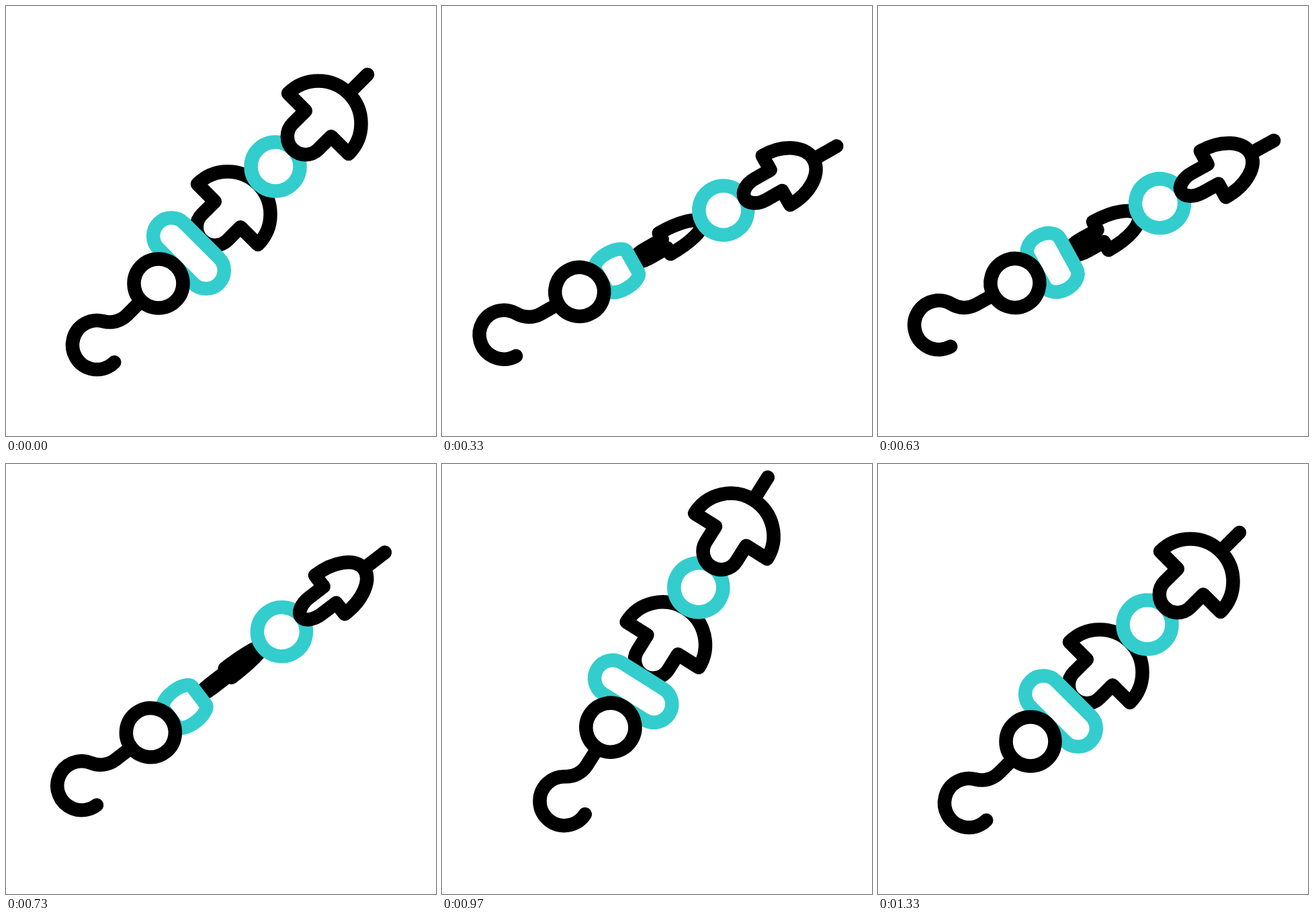
These frames come from a looping animation (640 by 640 pixels, 2000 ms). An HTML page with a canvas:

```html
<!DOCTYPE html>
<html lang="en">
<head>
<meta charset="utf-8">
<title>Skewer</title>
<style>
  html, body { margin: 0; height: 100%; overflow: hidden; background: #fff; }
  canvas { display: block; width: 100vw; height: 100vh; object-fit: contain; }
</style>
</head>
<body>
<canvas width="640" height="640"></canvas>
<script>
const ctx = document.querySelector('canvas').getContext('2d');
const BLACK = '#000', TEAL = '#33cdce';
const LOOP = 2000, FPS = 30;
const RING = 36.5, STEM = 27, CAP = 63.6;
const rad = deg => deg * Math.PI / 180;

function smooth(p) {
  p = Math.min(1, Math.max(0, p));
  return p * p * (3 - 2 * p);
}

// Eased progress from 0 to 1 between two moments, in animation steps.
const tween = (now, start, end) => smooth((now - start) / (end - start));

// Two equal dips below full width, the first deepest at the given moment.
function pinch(now, first, depth) {
  const dip = middle => smooth(1 - Math.abs(now - middle) / 7);
  return 1 - depth * (dip(first) + dip(first + 13.4));
}

// Squashes the outline across the stick while the line keeps its weight.
function piece(color, x, squash, outline) {
  ctx.save();
  ctx.translate(x, 0);
  ctx.scale(1, squash);
  ctx.beginPath();
  outline();
  ctx.closePath();
  ctx.restore();
  ctx.strokeStyle = color;
  ctx.fill();
  ctx.stroke();
}

const ring = () => ctx.arc(0, 0, RING, 0, rad(360));

function onion() {
  ctx.arc(0, -RING, STEM, rad(180), rad(360));
  ctx.arc(0, RING, STEM, 0, rad(180));
}

function mushroom() {
  ctx.arc(0, 0, CAP, rad(-90), rad(90));
  ctx.lineTo(0, STEM);
  ctx.arc(-STEM, 0, STEM, rad(90), rad(270));
  ctx.lineTo(0, -STEM);
}

function stick() {
  const hookX = -260.9;
  ctx.beginPath();
  ctx.moveTo(308.3, 0);
  ctx.arc(hookX + 2 * RING * Math.cos(rad(30)), -RING, RING, rad(90), rad(150));
  ctx.arc(hookX, 0, RING, rad(-30), rad(-270), true);
  ctx.strokeStyle = BLACK;
  ctx.stroke();
}

function draw(now) {
  const angle = 45 - 21.2 * tween(now, 0, 15.2) + 36.2 * tween(now, 15.2, 31.4) - 15 * tween(now, 31.4, 40);
  const drop = 54 * tween(now, 0, 14.5) - 94.5 * tween(now, 14.5, 28.2) + 40.5 * tween(now, 28.2, 39);
  const topWidth = 1 - 0.34 * tween(now, 0, 10) - 0.09 * tween(now, 16, 22) + 0.43 * tween(now, 22, 29);

  ctx.fillStyle = '#fff';
  ctx.fillRect(0, 0, 640, 640);
  ctx.lineWidth = 20.5;
  ctx.lineCap = ctx.lineJoin = 'round';
  ctx.save();
  ctx.translate(323.5, 316.5 + drop);
  ctx.rotate(-rad(angle));
  ctx.translate(-5, 0);
  stick();
  piece(BLACK, 14.1, pinch(now, 8.1, 0.88), mushroom);
  piece(TEAL, -67.9, pinch(now, 9, 0.56), onion);
  piece(BLACK, -131.5, 1, ring);
  piece(TEAL, 114.6, 1, ring);
  piece(BLACK, 205, topWidth, mushroom);
  ctx.restore();
}

function tick() {
  const time = performance.now() % LOOP;
  draw(Math.floor((time + 4) * FPS / 1000));
  requestAnimationFrame(tick);
}
tick();
</script>
</body>
</html>
```
